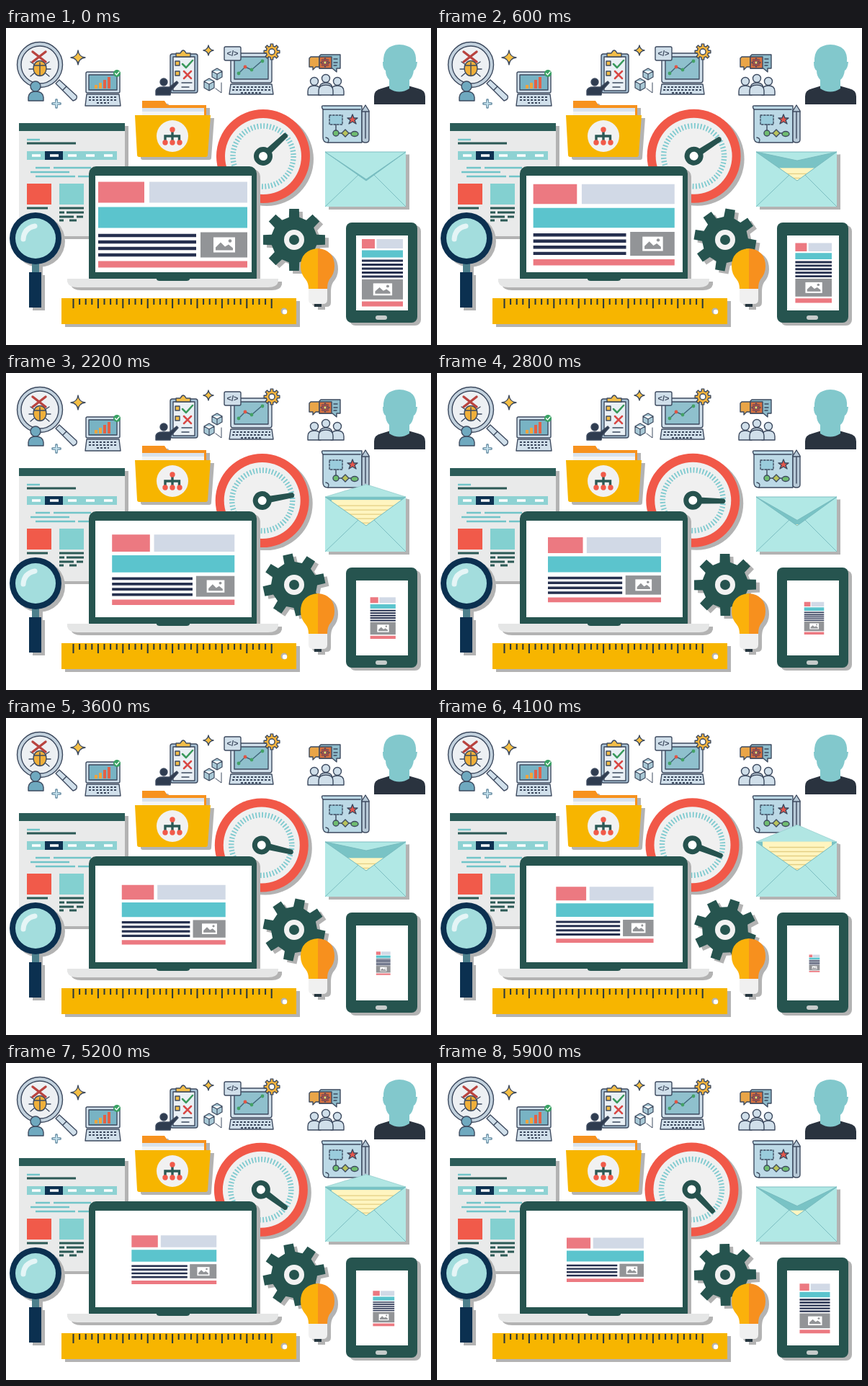
An HTML page that plays this animation: 590 px wide and 440 px high, repeating every 6000 ms.

```html
<!DOCTYPE html>
<html lang="en">
<head>
<meta charset="utf-8">
<title>Web design tools</title>
<style>
  html, body { margin: 0; width: 100%; height: 100%; overflow: hidden; background: #fff; }
  svg { display: block; width: 590px; height: 440px; }
  .shadow { filter: drop-shadow(5px 4px 0 #b3b3b3); }
  .icon { stroke: #3d4a5f; stroke-width: 1.4; stroke-linejoin: round; stroke-linecap: round; fill: #d0dfea; }
  .icon .none { fill: none; }
  .icon .plain { stroke: none; }
</style>
</head>
<body>
<svg viewBox="0 0 590 440">
  <defs>
    <clipPath id="mouth"><path d="M443 100H555V172L500 212L443 172Z"/></clipPath>
    <g id="photo">
      <rect width="65" height="35" fill="#929497"/>
      <rect x="18" y="7" width="30" height="21" fill="#fff"/>
      <path d="M21 25V21L28 14L34 20L39 17L45 22V25Z" fill="#929497"/>
      <circle cx="41" cy="12" r="2.3" fill="#929497"/>
    </g>
    <g id="member">
      <path d="M-9 13V8Q-9 0 0 0Q9 0 9 8V13Z"/>
      <circle cy="-6" r="5.5"/>
    </g>
  </defs>

  <!-- Bug search -->
  <g class="icon">
    <path d="M69 77L74 72L98 94Q100 99 93 101Z"/>
    <path class="none" d="M79 86L84 81"/>
    <circle cx="47" cy="51" r="31.5" fill="#c3d2de"/>
    <circle cx="47" cy="51" r="26" fill="#edf0f3"/>
    <path class="none" d="M34 47L40 51M32 57H40M34 67L40 62M60 47L54 51M62 57H54M60 67L54 62"/>
    <ellipse cx="47" cy="56" rx="9" ry="10.5" fill="#f0b03a"/>
    <path class="none" d="M47 48V66M39 52H55"/>
    <path d="M37 33L55 47M55 33L37 47" stroke="#b8433f" stroke-width="3.4"/>
    <path d="M31 101V96Q32 88 41 88Q51 88 52 96V101Z" fill="#6fa9bf"/>
    <circle cx="41" cy="81" r="7" fill="#6fa9bf"/>
    <path d="M100 31Q101 40 110 41Q101 42 100 51Q99 42 90 41Q99 40 100 31Z" fill="#f5bf45"/>
    <path d="M70 100V110M65 105H75" stroke="#7799ad" stroke-width="4"/>
    <path d="M70 101V109M66 105H74" stroke="#c9e6f1" stroke-width="1.7"/>
  </g>

  <!-- Small chart laptop -->
  <g class="icon">
    <rect x="111" y="61" width="47" height="29" rx="2"/>
    <rect x="115" y="65" width="39" height="21" fill="#78b3c4"/>
    <path class="plain" d="M123 79h4v5h-4zM129 76h4v8h-4z" fill="#f2a43c"/>
    <path class="plain" d="M135 72h4v12h-4zM141 68h4v16h-4z" fill="#e36146"/>
    <path d="M112 92H157L159 108H110Z"/>
    <path d="M115 96H154M115 100H154M126 104H143" stroke-width="2" stroke-dasharray="3 2" stroke-linecap="butt"/>
    <circle class="plain" cx="154" cy="63" r="5" fill="#38a263"/>
    <path class="none" d="M151.5 63L153.5 65L157 61" stroke="#fff"/>
  </g>

  <!-- Checklist -->
  <g class="icon">
    <rect x="228" y="36" width="38" height="54" rx="3" fill="#a9c2d5"/>
    <rect x="232" y="40" width="30" height="47" fill="#eaf0f5"/>
    <path d="M236 40V35H242Q246 27 250 35H256V40Z" fill="#f2bd49"/>
    <path d="M235 46h6v6h-6zM235 60h6v6h-6z" fill="#f2bd49"/>
    <path class="none" d="M245 50L250 55L259 45" stroke="#39995c" stroke-width="2.5"/>
    <path class="none" d="M247 60L257 70M257 60L247 70" stroke="#d94845" stroke-width="2.5"/>
    <path class="none" d="M244 76H258M244 82H254"/>
    <circle cx="219" cy="75" r="5" fill="#2f3c50"/>
    <path d="M208 93V87Q209 82 217 82L227 82L237 74L239 76L229 87L228 93Z" fill="#2f3c50"/>
    <path d="M281 24Q282 30 288 31Q282 32 281 38Q280 32 274 31Q280 30 281 24Z" fill="#f5bf45"/>
    <path d="M293 56L300 60V68L293 72L286 68V60ZM293 72V64M286 60L293 64L300 60" stroke-width="1.2" fill="#a9c9d6"/>
    <path d="M282 70L289 74V83L282 87L275 83V74ZM282 87V78M275 74L282 78L289 74" stroke-width="1.2" fill="#a9c9d6"/>
    <path class="none" d="M291 84L299 90V76" stroke-width="1"/>
  </g>

  <!-- Code laptop -->
  <g class="icon">
    <rect x="312" y="35" width="57" height="41" rx="3"/>
    <rect x="317" y="40" width="47" height="31" fill="#8fc0cd"/>
    <path class="none" d="M323 63L332 54L341 58L356 45" stroke="#3f6478"/>
    <g class="plain"><circle cx="323" cy="63" r="2.4" fill="#43a266"/><circle cx="332" cy="54" r="2.4" fill="#de5546"/><circle cx="341" cy="58" r="2.4" fill="#43a266"/><circle cx="356" cy="46" r="2.4" fill="#43a266"/></g>
    <path d="M312 78H369L371 92H310Z"/>
    <path d="M315 82H367M314 86H368M326 90H355" stroke-width="2" stroke-dasharray="3 2" stroke-linecap="butt"/>
    <rect x="303" y="26" width="23" height="19" rx="2"/>
    <text class="plain" x="314.5" y="39" font-family="Liberation Sans, sans-serif" font-size="11" font-weight="bold" text-anchor="middle" fill="#3d4a5f">&lt;/&gt;</text>
    <path id="yellowGear" fill="#f2b23c"/>
    <circle cx="369" cy="33" r="4" fill="#fff"/>
  </g>

  <!-- Team -->
  <g class="icon">
    <path d="M423 40H441V54H430L426 58V54H421V42Z" fill="#e9a548"/>
    <path d="M437 37H464V56H459V61L453 56H435V39Z" fill="#8fbccb"/>
    <rect x="435" y="40" width="17" height="16" fill="#d9703f"/>
    <path id="redGear" fill="#cf4b40" stroke-width="1"/>
    <circle cx="443" cy="48" r="2.3" fill="#f6d070" stroke-width="1"/>
    <path class="none" d="M455 43H460M455 48H460M455 52H459"/>
    <use href="#member" x="428" y="80"/><use href="#member" x="460" y="80"/><use href="#member" x="444" y="76"/>
    <path d="M434 93V87Q434 79 444 79Q454 79 454 87V93Z"/>
  </g>

  <!-- Blueprint -->
  <g class="icon">
    <path d="M440 113Q436 107 442 108H494V159H447Q440 159 440 152Z" fill="#bcd9e6"/>
    <path class="none" d="M440 113H492M447 159Q450 153 444 152"/>
    <rect x="449" y="121" width="18" height="13" fill="#9accdc" stroke-dasharray="2.5 2"/>
    <path d="M481 120L483 125H488L484 128L486 133L481 130L476 133L478 128L474 125H479Z" fill="#e5554b"/>
    <path class="none" d="M458 134V146H485"/>
    <circle cx="458" cy="146" r="4" fill="#6fbc70"/><path d="M471 141L476 146L471 151L466 146Z" fill="#b9c35c"/><ellipse cx="484" cy="147" rx="5" ry="3.5" fill="#6fbc70"/>
    <path d="M494 115L499 107L504 115V155Q504 159 499 159Q494 159 494 155Z" fill="#b8cad8"/>
    <path class="none" d="M494 116H504M499 117V153"/>
  </g>

  <!-- Silhouette -->
  <path d="M511 106V95Q511 86 521 84L534 80H558L572 84Q582 86 582 95V106Z" fill="#2a333f"/>
  <path d="M532 84V72Q527 67 527 59Q523 57 523 47H524Q523 24 546 23Q571 24 569 47H571Q570 57 566 59Q565 68 560 72V84Q546 93 532 84Z" fill="#82c8cc"/>

  <!-- Web page -->
  <g class="shadow">
    <rect x="18" y="132" width="147" height="157" fill="#e9eaea"/>
    <rect x="18" y="132" width="147" height="11" fill="#2b5c58"/>
  </g>
  <g fill="none" stroke="#2b5955" stroke-width="3">
    <path d="M29 155H47M41 194H61M66 194H118M34 200H88M41 206H96M100 206H117" stroke="#71c4c8" stroke-width="2.5"/>
    <path d="M29 160H97"/>
    <path d="M29 177H154" stroke="#8ed2d3" stroke-width="12"/>
    <path d="M54 177H79" stroke="#0d3151" stroke-width="12"/>
    <path d="M36 177H151" stroke="#fff" stroke-width="3.5" stroke-dasharray="12 13"/>
    <path d="M29 250H58M74 250H108M74 256H81M84 256H108M74 262H94M98 262H107M74 267H80M88 267H98"/>
  </g>
  <rect x="29" y="216" width="34" height="29" fill="#f15a4a"/>
  <rect x="74" y="216" width="34" height="29" fill="#83d0d0"/>

  <!-- Folder -->
  <g class="shadow">
    <path d="M189 101H220L224 107H278V130H189Z" fill="#f7921e"/>
    <path d="M189 111H275V130H189Z" fill="#d8e2ed"/>
    <path d="M189 116H275V130H189Z" fill="#f4f4f4"/>
    <path d="M179 121H284L280 176Q280 179 277 179H185Q182 179 182 176Z" fill="#f7b500"/>
  </g>
  <circle cx="231" cy="150" r="22" fill="#f1f1f1"/>
  <path d="M231 142V158M221 158V150H240.500V158" fill="none" stroke="#2b5955" stroke-width="3.400"/>
  <g fill="#f15a4a"><circle cx="231" cy="141" r="3.700"/><circle cx="221" cy="159" r="3.700"/><circle cx="231" cy="159" r="3.700"/><circle cx="241" cy="159" r="3.700"/></g>

  <!-- Gauge -->
  <g id="gauge" class="shadow">
    <circle r="65" fill="#f15848"/>
    <circle r="53" fill="#f0f0f0"/>
    <circle r="42" fill="none" stroke="#82cbd0" stroke-width="7.500" stroke-dasharray="1.900 2.498"/>
    <g id="needle" fill="#26524e">
      <path d="M9 -4.5L43 -3.5Q45 -3 45 0Q45 3 43 3.5L9 4.5Z"/>
      <circle r="9.500" fill="#fff" stroke="#26524e" stroke-width="7"/>
    </g>
  </g>

  <!-- Laptop -->
  <g class="shadow">
    <rect x="115" y="192" width="233" height="165" rx="10" fill="#26544f"/>
    <path d="M85 348H378V352Q376 360 364 360H99Q87 360 85 352Z" fill="#e5e6e6"/>
  </g>
  <path d="M209 347H255V349Q254 351 251 351H213Q210 351 209 349Z" fill="#26544f"/>
  <rect x="124" y="205" width="217" height="134" fill="#fff"/>
  <g id="laptopPage">
    <path d="M-103.5 -60h64v29h-64zM-103.5 50h207v9h-207z" fill="#ec7981"/>
    <path d="M-32.5 -60h136v29h-136z" fill="#d1d9e6"/>
    <path d="M-103.5 -25h207v29h-207z" fill="#5bc4cd"/>
    <path d="M-103.5 14.5H32.5M-103.5 23.5H32.5M-103.5 32.5H32.5M-103.5 41.5H32.5" stroke="#26304f" stroke-width="4.6"/>
    <use href="#photo" x="38.5" y="10"/>
  </g>

  <!-- Magnifier -->
  <g class="shadow">
    <rect x="36" y="324" width="10" height="20" fill="#4c7f8c"/>
    <rect x="32" y="339" width="17" height="49" fill="#0b3050"/>
    <circle cx="41" cy="292" r="36" fill="#0b3050"/>
  </g>
  <circle cx="41" cy="292" r="28" fill="#a3dddd"/>
  <path d="M24 293Q25 278 40 275" fill="none" stroke="#e5f5f6" stroke-width="7" stroke-linecap="round"/>

  <!-- Ruler -->
  <rect class="shadow" x="77" y="375" width="326" height="36" fill="#f7b500"/>
  <path id="ticks" stroke="#26363f" stroke-width="2"/>
  <circle cx="386" cy="393" r="4.5" fill="#b3b3b3"/>
  <circle cx="387" cy="394" r="3.2" fill="#fff"/>

  <!-- Gear and bulb -->
  <g class="shadow"><path id="gear" fill="#26544f"/></g>
  <circle cx="400" cy="294" r="14" fill="#f2f2f2"/>
  <circle cx="400" cy="294" r="7" fill="#26544f"/>
  <g class="shadow">
    <path d="M428 380H438V387H428Z" fill="#26363f"/>
    <path d="M420 360H446V377Q446 383 440 383H426Q420 383 420 377Z" fill="#f0f0f0"/>
    <path d="M433 306Q409 308 409 331Q409 341 416 349Q420 354 420 362H433Z" fill="#fbb10b"/>
    <path d="M433 306Q456 308 456 331Q456 341 449 349Q446 354 446 362H433Z" fill="#f7901e"/>
  </g>

  <!-- Tablet -->
  <rect class="shadow" x="472" y="270" width="99" height="139" rx="8" fill="#26544f"/>
  <rect x="486" y="288" width="72" height="104" fill="#fff"/>
  <rect x="513" y="399" width="16" height="6" rx="3" fill="#c6cccb"/>
  <g id="tabletPage">
    <path d="M-28.5 -47h18v13h-18zM-28.5 39.5h57v7h-57z" fill="#ec7981"/>
    <path d="M-8 -47h36.5v13h-36.5z" fill="#d1d9e6"/>
    <path d="M-28.5 -31.5h57v10h-57z" fill="#5bc4cd"/>
    <path d="M-28.5 -17H28.5M-28.5 -11.5H28.5M-28.5 -6H28.5M-28.5 -.5H28.5M-28.5 5H28.5" stroke="#26304f" stroke-width="3.2"/>
    <use href="#photo" transform="translate(-28.5 8.8) scale(.877 .8)"/>
  </g>

  <!-- Envelope -->
  <g class="shadow">
    <path id="flapBack" fill="#b1e6e3" stroke="#91cccb" stroke-width=".7"/>
    <rect x="443" y="172" width="112" height="76" fill="#79c3c5"/>
    <g clip-path="url(#mouth)">
      <g id="letter">
        <rect x="452" width="96" height="90" fill="#fff5c0"/>
        <path d="M461 8H538M461 14H538M461 20H538M461 26H538M461 32H538M461 38H538" stroke="#e4cf84" stroke-width="1.3"/>
      </g>
    </g>
    <path d="M443 172L500 212L555 172V248H443Z" fill="#b1e8e5"/>
    <path d="M443 172L500 212L555 172M443 248L489 204M555 248L511 204" fill="none" stroke="#75b8bd" stroke-width=".9"/>
    <path id="flapFront" fill="#b1e8e5" stroke="#75b8bd" stroke-width=".9"/>
  </g>
</svg>
<script>
  const $ = id => document.getElementById(id);
  const set = (id, name, value) => $(id).setAttribute(name, value);

  function gearPath(cx, cy, outer, inner) {
    const points = [];
    for (let tooth = 0; tooth < 8; tooth++) {
      for (const [offset, radius] of [[-13, inner], [-9, outer], [9, outer], [13, inner]]) {
        const a = (tooth * 45 + offset) * Math.PI / 180;
        points.push(`${cx + radius * Math.cos(a)} ${cy + radius * Math.sin(a)}`);
      }
    }
    return `M${points.join('L')}Z`;
  }

  set('gear', 'd', gearPath(0, 0, 43.5, 32));
  set('yellowGear', 'd', gearPath(369, 33, 11, 8));
  set('redGear', 'd', gearPath(443, 48, 6, 4.2));
  set('ticks', 'd', Array.from({ length: 33 }, (_, i) =>
    `M${93.5 + i * 8.6} 376V${i % 4 ? 384 : 389}`).join(''));

  // Tenths of a second in which the previous pose is held.
  const held = [5, 9, 13, 17, 21, 29, 33, 37, 45, 47, 49, 53, 57];

  function draw() {
    const tenth = Math.floor(performance.now() % 6000 / 100);
    const step = tenth - held.filter(h => h <= tenth).length;
    const progress = step / 46;
    const turn = 89 * progress;

    set('laptopPage', 'transform', `translate(${231.5 + 2 * progress} 273.5) scale(${1 - .483 * progress})`);

    const tabletWidth = Math.max(57 - 1.28 * step, 20 + 2.45 * (step - 37));
    set('tabletPage', 'transform', `translate(${522.5 + 2 * progress} ${340 + progress}) scale(${tabletWidth / 57})`);

    set('gauge', 'transform', `translate(${357 - 3.5 * progress} ${178 - 2.5 * progress})`);
    set('needle', 'transform', `rotate(${turn - 43})`);
    set('gear', 'transform', `translate(400 294) rotate(${turn})`);

    const fromOpen = Math.abs(step % 24 - 12.6);
    const tip = 172 - 38 * Math.cos(Math.PI * Math.min(1, fromOpen / 12.6));
    const flap = `M443 172L500 ${tip}L555 172Z`;
    set('flapBack', 'd', tip < 172 ? flap : '');
    set('flapFront', 'd', tip < 172 ? '' : flap);
    set('letter', 'transform', `translate(0 ${151 + 5.7 * fromOpen})`);

    requestAnimationFrame(draw);
  }
  draw();
</script>
</body>
</html>
```
